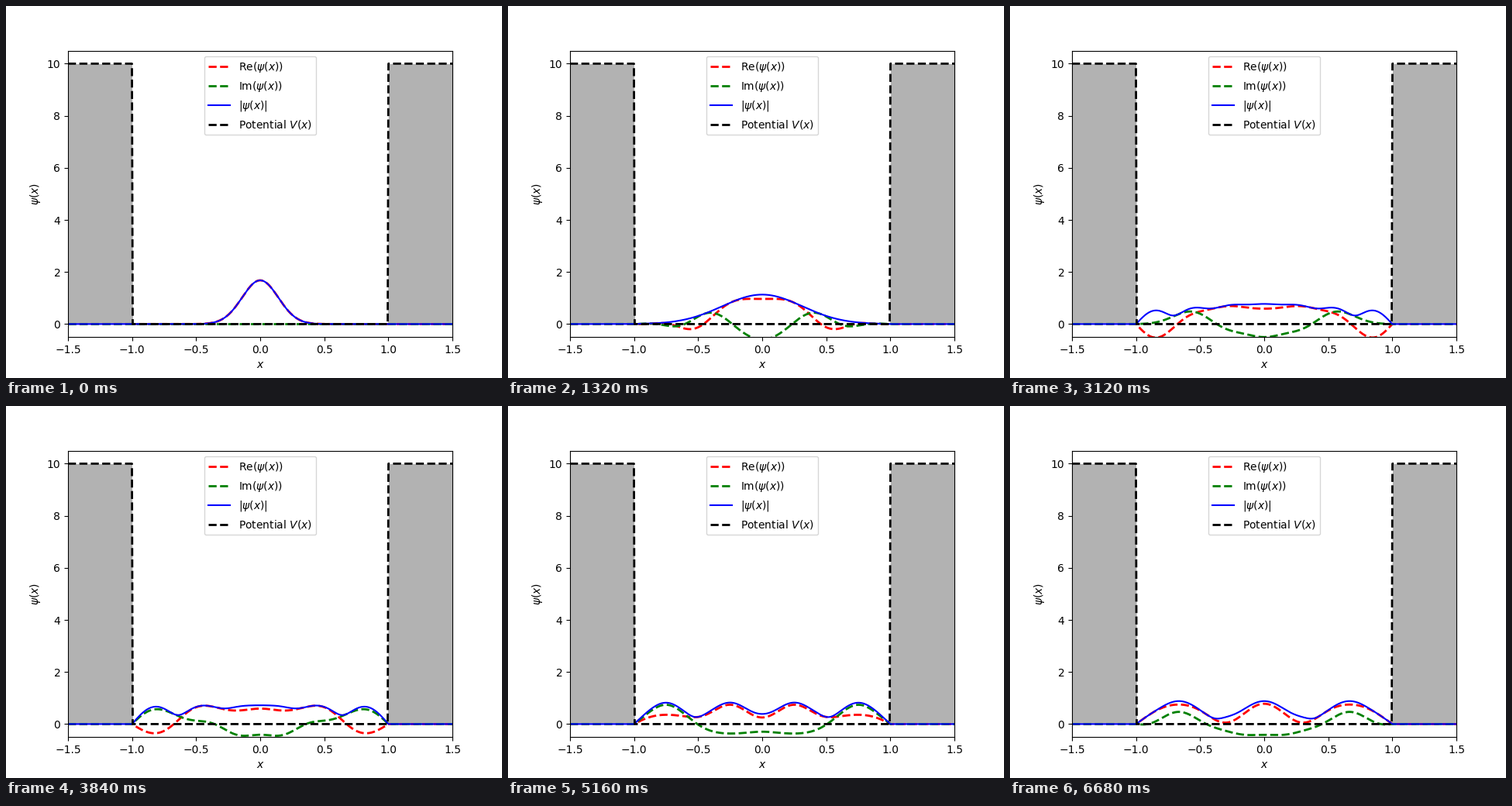
Recreate the animation shown at these times as a matplotlib script. Size 640 by 480 pixels, loop 6720 ms.

```python
import matplotlib.pyplot as plt
import numpy as np
from matplotlib.animation import FuncAnimation

FRAMES, INTERVAL = 168, 40
DT = 0.00119        # simulated time per frame
SIGMA = 0.2         # width of the initial packet exp(-(x / SIGMA)**2)
WALL, V0 = 1.0, 10.0

x = np.linspace(-1.5, 1.5, 500)
inside = np.abs(x) < WALL
V = np.where(inside, 0.0, V0)

# Even eigenstates of the infinite well and the packet's overlap with them
n = np.arange(1, 40, 2)
k = n * np.pi / (2 * WALL)
energy = k**2 / 2
amp = (np.pi * SIGMA**2) ** -0.25
coef = amp * SIGMA * np.sqrt(np.pi) / WALL * np.exp(-((k * SIGMA) ** 2) / 4)
modes = np.cos(np.outer(x, k)) * inside[:, None]


def psi(t):
    return modes @ (coef * np.exp(-1j * energy * t))


fig, ax = plt.subplots(figsize=(6.4, 4.8), dpi=100)
re_line, = ax.plot([], [], "r--", lw=2, label=r"Re($\psi(x)$)")
im_line, = ax.plot([], [], "g--", lw=2, label=r"Im($\psi(x)$)")
abs_line, = ax.plot([], [], "b-", lw=1.5, label=r"$|\psi(x)|$")
ax.plot(x, V, "k--", lw=2, label=r"Potential $V(x)$")
ax.fill_between(x, 0, V, color="k", alpha=0.3, lw=0)
ax.set_xlim(-1.5, 1.5)
ax.set_ylim(-0.5, 10.5)
ax.set_xlabel(r"$x$")
ax.set_ylabel(r"$\psi(x)$")
ax.legend(loc="upper center")


def update(i):
    p = psi(i * DT)
    re_line.set_data(x, p.real)
    im_line.set_data(x, p.imag)
    abs_line.set_data(x, np.abs(p))
    return re_line, im_line, abs_line


anim = FuncAnimation(fig, update, frames=FRAMES, interval=INTERVAL,
                     repeat=True, repeat_delay=0)
plt.show()
```
